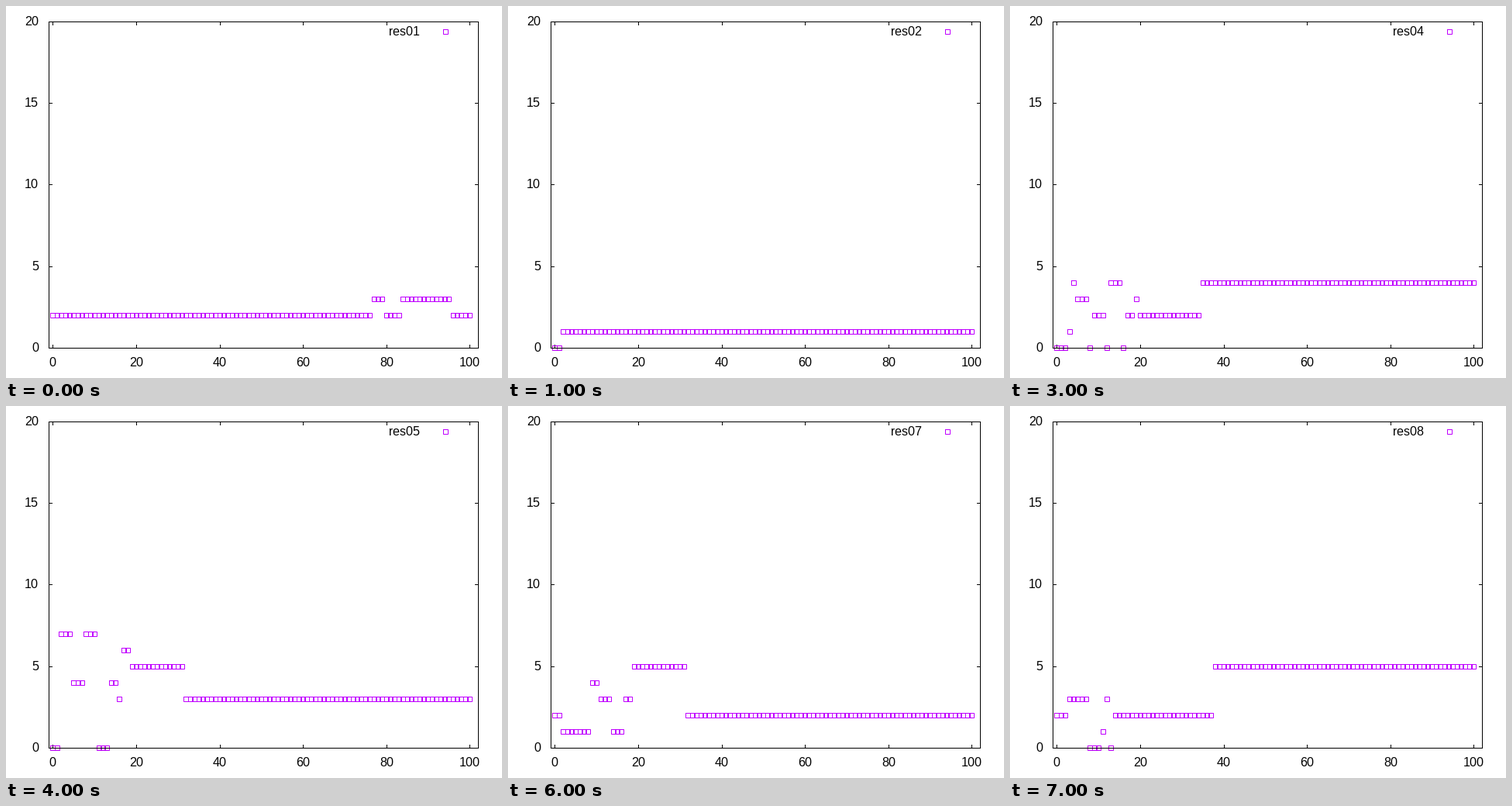
A matplotlib script for the animation above (8 s loop, 640x480 px).

```python
import numpy as np
import matplotlib.pyplot as plt
from matplotlib.animation import FuncAnimation
from matplotlib.collections import LineCollection

# Whole-pixel glyph advances and unsimplified pixel paths
plt.rcParams.update({"text.hinting": "default", "text.hinting_factor": 1,
                     "path.simplify": False})

W, H, DPI = 640, 480, 100
PX = 72 / DPI  # one pixel in points
LEFT, RIGHT, TOP, BOTTOM = 55, 609, 20, 441
XMIN, XMAX, YMAX = -1, 102, 20
TICK = 4
PURPLE = "#c000ff"
FONT = dict(family="Liberation Sans", size=16 * PX, color="black",
            va="baseline")


def px(x):
    return LEFT + np.floor((x - XMIN) * (RIGHT - LEFT) / (XMAX - XMIN) + 0.5)


def py(y):
    return BOTTOM - np.floor(y * (BOTTOM - TOP) / YMAX + 0.5)


def series(seed, noisy, low, high, plateaus):
    """Plateaus from (start, level) pairs, with random steps in one span."""
    rng = np.random.default_rng(seed)
    y = np.zeros(101, dtype=int)
    for start, level in plateaus:
        y[start:] = level
    x, end = noisy
    while x < end:
        step = rng.integers(1, 4)
        y[x:min(x + step, end)] = rng.integers(low, high + 1)
        x += step
    return y


# Noisy span, its lowest and highest level, plateaus
RUNS = [
    ((77, 96), 2, 3, [(0, 2)]),
    ((0, 0), 0, 0, [(2, 1)]),
    ((0, 11), 1, 6, [(11, 3), (26, 4), (31, 6), (57, 3)]),
    ((0, 20), 0, 5, [(20, 2), (35, 4)]),
    ((2, 19), 0, 7, [(19, 5), (32, 3)]),
    ((1, 20), 0, 5, [(20, 2), (33, 4)]),
    ((0, 19), 0, 4, [(19, 5), (32, 2)]),
    ((0, 14), 0, 3, [(14, 2), (38, 5)]),
]
DATA = [series(seed, *run) for seed, run in enumerate(RUNS)]


def add_lines(ax, segments, zorder):
    lines = LineCollection(np.array(segments) + 0.5, colors="black",
                           linewidths=PX, capstyle="projecting", zorder=zorder)
    lines.set_snap(False)
    ax.add_collection(lines)


fig = plt.figure(figsize=(W / DPI, H / DPI), dpi=DPI, facecolor="white")
ax = fig.add_axes([0, 0, 1, 1])
ax.set_xlim(0, W)
ax.set_ylim(H, 0)
ax.axis("off")

# Ticks lie below the points, the border above them
ticks = []
for x in range(0, 101, 20):
    p = px(x)
    ticks += [[(p, BOTTOM), (p, BOTTOM - TICK)], [(p, TOP), (p, TOP + TICK)]]
    ax.text(p, 465, str(x), ha="center", **FONT)
for y in range(0, YMAX + 1, 5):
    p = py(y)
    ticks += [[(LEFT, p), (LEFT + TICK, p)], [(RIGHT, p), (RIGHT - TICK, p)]]
    ax.text(42, p + 5, str(y), ha="right", **FONT)
add_lines(ax, ticks, 1)

corners = [(LEFT, TOP), (RIGHT, TOP), (RIGHT, BOTTOM), (LEFT, BOTTOM)]
add_lines(ax, list(zip(corners, corners[1:] + corners[:1])), 3)

# All squares form one line, with gaps between them
points, = ax.plot([], [], color=PURPLE, lw=PX, solid_joinstyle="miter",
                  solid_capstyle="projecting", snap=False, zorder=2)
SQUARE_X = np.array([-3, 3, 3, -3, -3, np.nan])
SQUARE_Y = np.array([-3, -3, 3, 3, -3, np.nan])
KEY = (567, 33)
centre_x = np.append(px(np.arange(101)), KEY[0]) + 0.5
title = ax.text(534, 38, "", ha="right", **FONT)


def draw(i):
    centre_y = np.append(py(DATA[i]), KEY[1]) + 0.5
    points.set_data(np.add.outer(centre_x, SQUARE_X).ravel(),
                    np.add.outer(centre_y, SQUARE_Y).ravel())
    title.set_text(f"res{i + 1:02d}")
    return points, title


anim = FuncAnimation(fig, draw, frames=len(RUNS), interval=1000,
                     repeat=True, repeat_delay=0)
plt.show()
```
